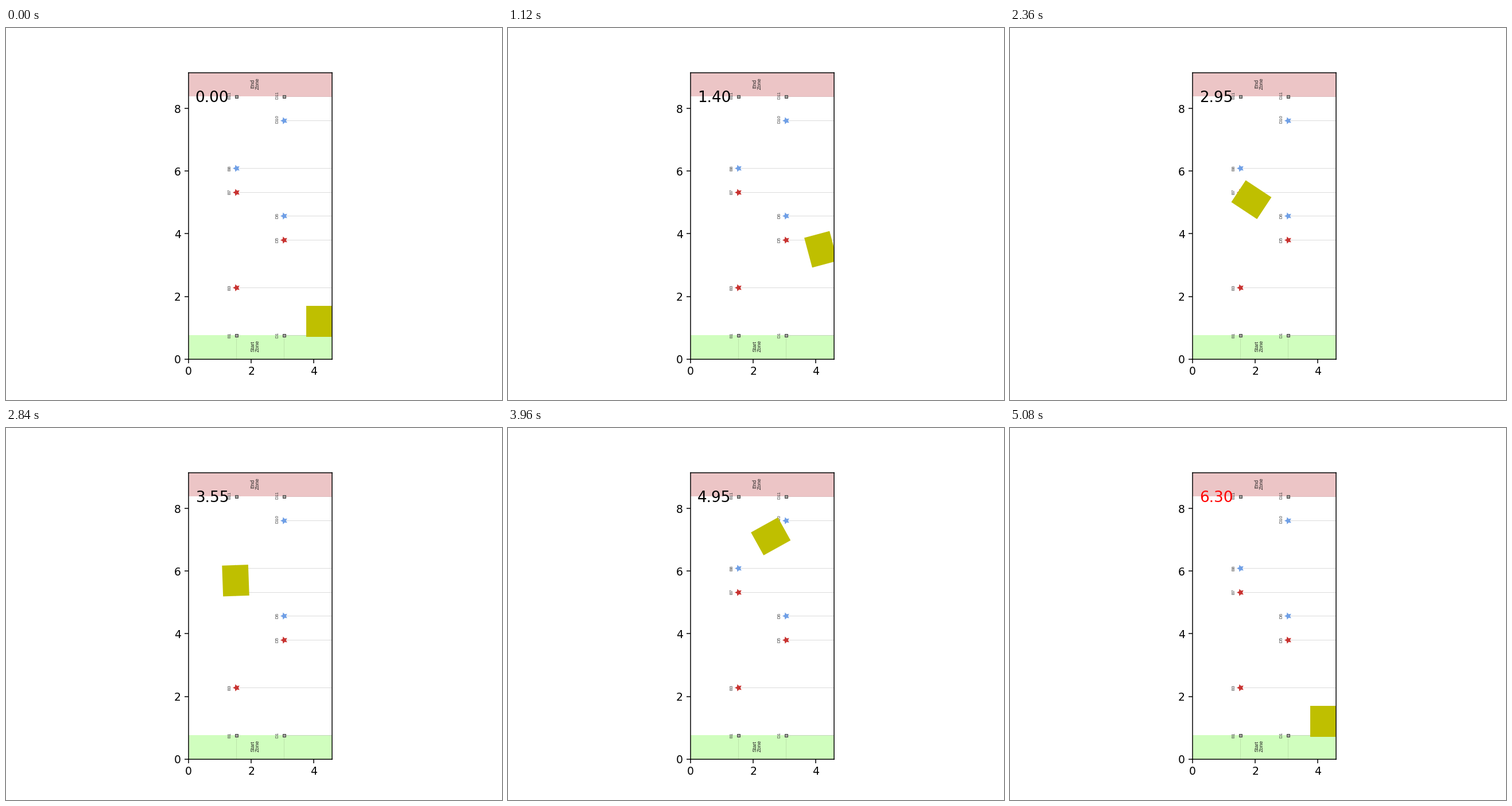
A matplotlib script that plays this animation: 864x648 px, repeating every 8000 ms.

```python
import numpy as np
import matplotlib.pyplot as plt
from matplotlib.animation import FuncAnimation
from matplotlib.patches import Polygon, Rectangle

DPI = 135
STEP = 0.762                      # grid pitch in metres
WIDTH, LENGTH = 6 * STEP, 12 * STEP
PX = LENGTH / (0.77 * 648)        # one pixel in metres
PT = 72 / DPI                     # one pixel in points
DT, MOVES, FRAMES = 0.05, 127, 200

RED, BLUE, INK = "#c83230", "#6f9fe6", "#404040"
COLUMNS = {"B": 2 * STEP, "D": 4 * STEP}

# time, x, y, heading in degrees left of straight up
KEYS = np.array([
    (0.00, 4.176, 1.204, 0),
    (1.40, 4.159, 3.504, 15),
    (2.10, 3.452, 4.308, 67),
    (2.35, 2.876, 4.589, 64),
    (3.55, 1.502, 5.699, 2),
    (4.25, 1.639, 6.653, -40),
    (4.95, 2.559, 7.109, -61),
    (6.30, 2.950, 8.050, -3),
])
TIME, POINT, TURN = KEYS[:, 0], KEYS[:, 1:3], np.radians(KEYS[:, 3])

# Speed at each key point follows from the distance between its neighbours.
hops = np.hypot(*np.diff(POINT, axis=0).T)
speed = np.gradient(np.append(0, np.cumsum(hops)), TIME)
speed[[0, -1]] = 0.5
VELOCITY = speed[:, None] * np.column_stack((-np.sin(TURN), np.cos(TURN)))


def pose(t):
    """Cubic Hermite path; the robot always faces along its motion."""
    i = int(np.clip(np.searchsorted(TIME, t, "right") - 1, 0, len(TIME) - 2))
    span = TIME[i + 1] - TIME[i]
    s = (t - TIME[i]) / span
    m0, m1 = VELOCITY[i] * span, VELOCITY[i + 1] * span
    chord = POINT[i + 1] - POINT[i]
    b, c = 3 * chord - 2 * m0 - m1, m0 + m1 - 2 * chord
    pos = POINT[i] + s * (m0 + s * (b + s * c))
    vx, vy = m0 + s * (2 * b + 3 * s * c)
    return pos, np.arctan2(-vx, vy)


def corners(t):
    pos, a = pose(t)
    w, h = 0.418, 0.492
    box = np.array([(-w, -h), (w, -h), (w, h), (-w, h)])
    c, s = np.cos(a), np.sin(a)
    return box @ np.array([(c, s), (-s, c)]) + pos


def label(x, y, text, size, color, va="center"):
    ax.text(x, y, text, rotation=90, fontsize=size * PT, color=color,
            family="Liberation Sans", ha="center", va=va, zorder=1.5)


def line(xs, ys, color):
    ax.plot(xs, ys, color=color, lw=PT, zorder=1.2, solid_capstyle="butt")


def spot(col, row, **style):
    """A marker on the grid with its name beside it."""
    x, y = COLUMNS[col], row * STEP
    ax.plot(x, y, zorder=1.5, **style)
    label(x - 11.5 * PX, y - 4.8 * PX, f"{col}{row}", 8, INK, "bottom")


def zone(y, color, word):
    ax.add_patch(Rectangle((0, y), WIDTH, STEP, fc=color, lw=0, zorder=1))
    mid = y + STEP / 2 + 1.8 * PX
    label(111.5 * PX, mid, word, 9, "#202020")
    label(120.5 * PX, mid, "Zone", 9, "#202020")


fig, ax = plt.subplots(figsize=(6.4, 4.8), dpi=DPI)
ax.set_aspect("equal")
ax.set_xlim(0, WIDTH)
ax.set_ylim(0, LENGTH)
ax.tick_params(axis="x", pad=3)

zone(0, "#d0febe", "Start")
zone(11 * STEP, "#ecc5c6", "End")
line([COLUMNS["D"], WIDTH], [STEP, STEP], "#c3d8ba")
line([COLUMNS["D"], WIDTH], [11 * STEP, 11 * STEP], "#dfbcbd")

for col, x in COLUMNS.items():
    line([x, x], [0, STEP], "#bbe4aa")
    for row in (1, 11):
        spot(col, row, marker="s", ms=5 * PT, mfc="#a0a09c", mec=INK, mew=PT)

for color, names in ((RED, "B3 D5 B7"), (BLUE, "D6 B8 D10")):
    for name in names.split():
        col, row = name[0], int(name[1:])
        line([COLUMNS[col], WIDTH], [row * STEP] * 2, "#dcdcdc")
        spot(col, row, marker=(5, 1, 90), ms=13 * PT, color=color, mew=0)

# Below the frame of the axes, above everything on the field.
robot = ax.add_patch(Polygon(corners(0), closed=True, fc="y", lw=0, zorder=2))
clock = ax.text(0.75, 8.2, "0.00", fontsize=14, ha="center", va="baseline", zorder=5)


def update(n):
    moving = n < MOVES
    robot.set_xy(corners(n * DT if moving else 0))
    clock.set_text(f"{min(n, MOVES - 1) * DT:.2f}")
    clock.set_color("black" if moving else "red")
    return robot, clock


anim = FuncAnimation(fig, update, frames=FRAMES, interval=40,
                     init_func=lambda: update(0), repeat=True, repeat_delay=0)
plt.show()
```
